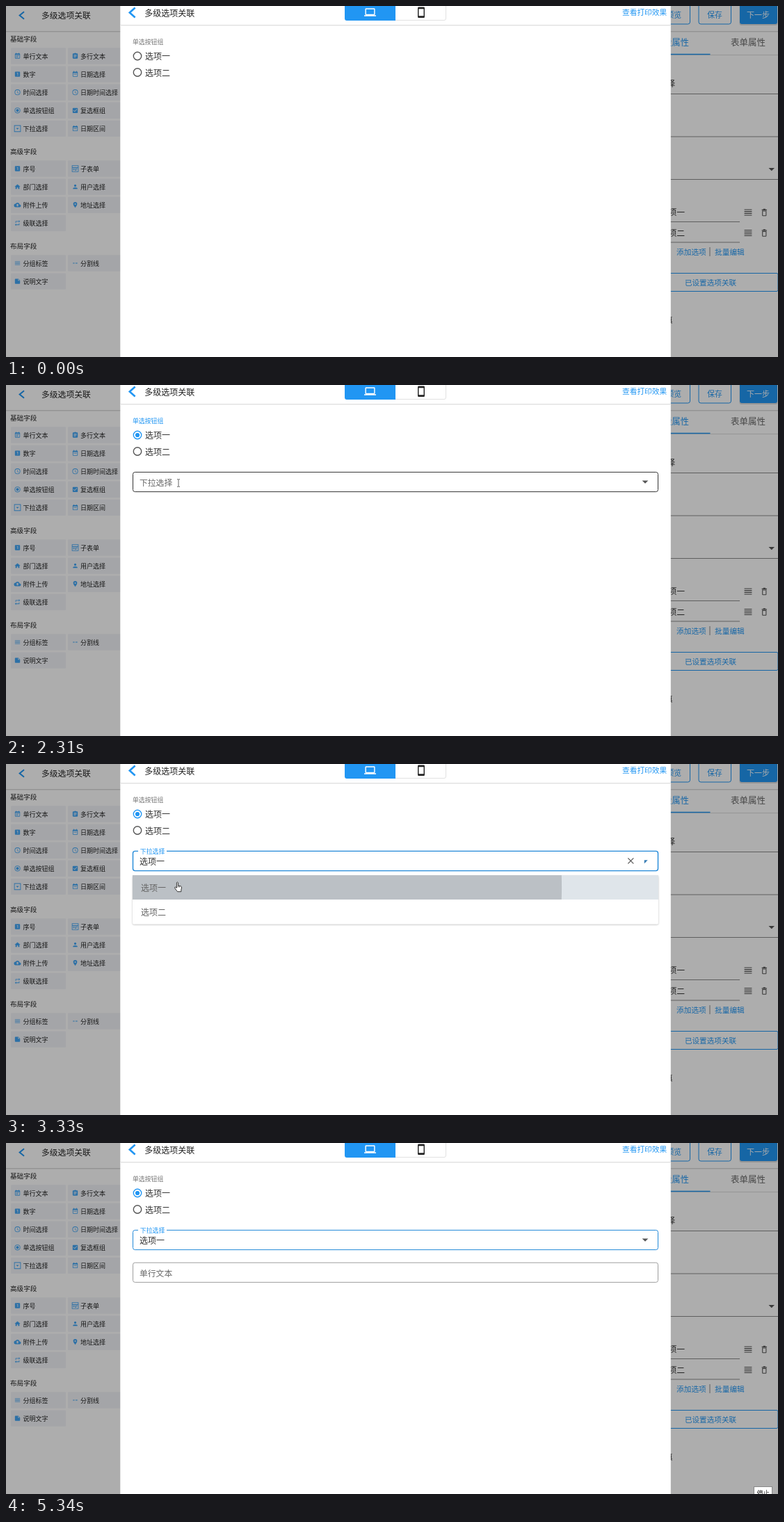
An HTML page that plays this animation: 1110x505 px, repeating every 5430 ms.

```html
<!DOCTYPE html>
<html lang="zh-CN">
<head>
<meta charset="utf-8">
<title>多级选项关联</title>
<style>
html, body { margin: 0; width: 100%; height: 100%; overflow: hidden; background: #fff; }
svg { display: block; width: 1110px; height: 505px; }
text { font-family: "Noto Sans CJK SC", "Noto Sans CJK", "Noto Sans", sans-serif; font-weight: 300; white-space: pre; }
</style>
</head>
<body>
<svg id="stage" viewBox="0 0 1110 505" xmlns="http://www.w3.org/2000/svg"></svg>
<script>
const LOOP = 5430, TICK = 77.5, LAST = 69;
const BLUE = '#2196f3', INK = '#333', GREY = '#666';

// ---- markup helpers; text is placed by its vertical centre ----
const text = (x, cy, size, str, fill = INK, extra = '') =>
  `<text x="${x}" y="${cy + size * 0.38}" font-size="${size}" fill="${fill}" ${extra}>${str}</text>`;
const rect = (x, y, w, h, fill, extra = '') =>
  `<rect x="${x}" y="${y}" width="${w}" height="${h}" fill="${fill}" ${extra}/>`;
const line = (x1, y1, x2, y2, stroke, width = 1) =>
  `<path d="M${x1} ${y1}L${x2} ${y2}" stroke="${stroke}" stroke-width="${width}" fill="none"/>`;
const END = 'text-anchor="end"', MID = 'text-anchor="middle"';

// ---- icons on a 24 unit grid ----
const frame = 'M5 3H19Q21 3 21 5V19Q21 21 19 21H5Q3 21 3 19V5Q3 3 5 3Z';
const pegs = 'M6 1H8V3H6ZM16 1H18V3H16Z';
const ring = 'M12 2A10 10 0 0 1 12 22A10 10 0 0 1 12 2ZM12 4A8 8 0 0 0 12 20A8 8 0 0 0 12 4Z';
const icons = {
  line: frame + pegs + 'M5 8H19V19H5ZM7 10H17V12H7ZM7 14H14V16H7Z',
  area: frame + 'M9 3Q9 1 12 1Q15 1 15 3ZM7 7H17V9H7ZM7 11H17V13H7ZM7 15H14V17H7Z',
  one: frame + 'M10 7H14V17H12V9H10Z',
  date: frame + pegs + 'M5 8H19V19H5ZM7 11H17V13H7Z',
  clock: ring + 'M11 7H12.5V12.2L17 15L16.2 16.2L11 13Z',
  radio: ring + 'M12 7A5 5 0 0 1 12 17A5 5 0 0 1 12 7Z',
  check: frame + 'M10 17L5 12L6.4 10.6L10 14.2L17.6 6.6L19 8Z',
  drop: 'M1 1H23V23H1ZM3 3V21H21V3ZM7 10H17L12 15Z',
  table: 'M1 1H23V23H1ZM3 3V7H21V3ZM3 9V21H21V9ZM5 11H10V13H5ZM12 11H19V13H12ZM5 15H10V17H5ZM12 15H16V19H12Z',
  home: 'M10 20V14H14V20H19V12H22L12 3L2 12H5V20Z',
  user: 'M12 4A4 4 0 0 1 12 12A4 4 0 0 1 12 4ZM12 14Q20 14 20 18V20H4V18Q4 14 12 14Z',
  cloud: 'M6 20A6 6 0 0 1 5.3 8A7.5 7.5 0 0 1 19.3 10A5 5 0 0 1 19 20ZM14 13H17L12 8L7 13H10V17H14Z',
  pin: 'M12 2A7 7 0 0 1 19 9Q19 14 12 22Q5 14 5 9A7 7 0 0 1 12 2ZM12 6.5A2.5 2.5 0 0 0 12 11.5A2.5 2.5 0 0 0 12 6.5Z',
  loop: 'M17 17H7V14L3 18L7 22V19H19V13H17ZM7 7H17V10L21 6L17 2V5H5V11H7Z',
  rows: 'M3 6H21V8H3ZM3 11H21V13H3ZM3 16H21V18H3Z',
  dash: 'M4 11H10V13H4ZM13 11H20V13H13Z',
  note: 'M5 3H15L21 9V19Q21 21 19 21H5Q3 21 3 19V5Q3 3 5 3ZM14 4.5V10H19.5Z',
  lines: 'M2 3.5H22V5.5H2ZM2 8.5H22V10.5H2ZM2 13.5H22V15.5H2ZM2 18.5H22V20.5H2Z',
  trash: 'M5 4H9V2H15V4H19V6H5ZM6 7H18V20Q18 22 16 22H8Q6 22 6 20ZM8 9V20H16V9Z',
  laptop: 'M4 6V16H20V6ZM4 4H20Q22 4 22 6V16Q22 18 20 18H24V20H0V18H4Q2 18 2 16V6Q2 4 4 4Z',
  phone: 'M7 1H17Q19 1 19 3V21Q19 23 17 23H7Q5 23 5 21V3Q5 1 7 1ZM7 5V19H17V5Z'
};
const icon = (name, cx, cy, size, fill = BLUE, extra = '') =>
  `<path d="${icons[name]}" fill="${fill}" fill-rule="evenodd" ${extra} ` +
  `transform="translate(${cx - size / 2} ${cy - size / 2}) scale(${size / 24})"/>`;
const chevron = (cx, cy, w, h, width) =>
  `<path d="M${cx + w} ${cy - h}L${cx - w} ${cy}L${cx + w} ${cy + h}" fill="none" stroke="${BLUE}" stroke-width="${width}"/>`;

// ---- page behind the dialog ----
const groups = [
  ['基础字段', 47.5, 72, [['line', '单行文本'], ['area', '多行文本'], ['one', '数字'], ['date', '日期选择'],
    ['clock', '时间选择'], ['clock', '日期时间选择'], ['radio', '单选按钮组'], ['check', '复选框组'],
    ['drop', '下拉选择'], ['date', '日期区间']]],
  ['高级字段', 209, 234, [['one', '序号'], ['table', '子表单'], ['home', '部门选择'], ['user', '用户选择'],
    ['cloud', '附件上传'], ['pin', '地址选择'], ['loop', '级联选择']]],
  ['布局字段', 345, 370, [['rows', '分组标签'], ['dash', '分割线'], ['note', '说明文字']]]
];
function palette() {
  return groups.map(([title, ty, top, list]) => text(6, ty, 9.6, title, '#222') + list.map(([ic, name], i) => {
    const x = i % 2 ? 89 : 7, cy = top + (i >> 1) * 26.1;
    const big = ic === 'drop' || ic === 'table';
    return rect(x, cy - 11.7, i % 2 ? 80 : 79, 23.4, '#f1f3f7', 'rx="1"') +
      icon(ic, x + (i % 2 ? 10.5 : 9.5), cy, big ? 10.5 : 9.8, BLUE, 'opacity=".85"') +
      text(x + (i % 2 ? 18 : 17.5), cy + .3, 9, name, '#222');
  }).join('')).join('');
}
function settings() {
  let s = rect(920, -4.5, 63.5, 30.5, 'none', `rx="3" stroke="${BLUE}"`) + text(971, 13, 10.8, '预览', BLUE, END) +
    rect(996, -4.5, 46.5, 30.5, 'none', `rx="3" stroke="${BLUE}"`) + text(1019, 13, 10.8, '保存', BLUE, MID) +
    rect(1054.5, -3, 55, 31, '#000', 'rx="3" opacity=".14"') + rect(1055, -5, 54, 31, BLUE, 'rx="3"') +
    text(1081.5, 13, 11, '下一步', '#fff', MID) +
    line(0, 36.5, 1110, 36.5, '#d8d8d8') + line(0, 37.5, 1110, 37.5, '#eee') +
    text(982, 52, 12.2, '字段属性', BLUE, END) + text(1067, 52, 12.5, '表单属性', GREY, MID) +
    line(950, 70.5, 1110, 70.5, '#ddd') + line(950, 69.5, 1012.5, 69.5, BLUE, 1.6) +
    text(962, 112, 11.8, '下拉选择', INK, END) +
    [126.5, 188, 249.5].map(y => line(950, y, 1110, y, '#8b8b8b')).join('') +
    '<path d="M1096.5 233H1105L1100.8 237.3Z" fill="#555"/>';
  [['选项一', 297], ['选项二', 326.5]].forEach(([name, y]) => {
    s += text(976, y, 11.8, name, INK, END) + line(950, y + 13.5, 1055, y + 13.5, '#8b8b8b') +
      icon('lines', 1067, y, 13, '#555') + icon('trash', 1090.3, y, 12.5, '#555');
  });
  return s + text(964, 353.5, 10.7, '添加选项', BLUE) + line(1012, 347, 1012, 360, '#888') +
    text(1019, 353.5, 10.7, '批量编辑', BLUE) +
    rect(900, 384.5, 210, 26, 'none', `rx="2" stroke="${BLUE}"`) +
    text(1013, 397.5, 10.6, '已设置选项关联', BLUE, MID) + text(958.5, 452, 11, '必填', INK, END);
}

// ---- dialog ----
const radio = (id, cy, name) =>
  `<circle id="${id}" cx="189" cy="${cy}" r="5.7" fill="none" stroke="#555" stroke-width="1.4"/>` + text(200, cy + .6, 12, name);
const outline = (id, y) => rect(182.5, y, 755, 28.2, '#fff', `id="${id}" rx="3" stroke="#9e9e9e"`);
const dialog = () => rect(164.3, 0, 791.5, 505, '#fff') +
  chevron(181.7, 9.5, 3.9, 7, 2.6) + text(199.3, 10, 12, '多级选项关联', '#222') +
  '<path d="M487 0H560V21H490Q487 21 487 18Z" fill="#2196f3"/>' +
  '<path d="M560 20.5H630Q632.5 20.5 632.5 18V0" fill="none" stroke="#e2e2e2"/>' +
  icon('laptop', 523.5, 9, 17, '#fff') + icon('phone', 597, 9.3, 17, '#222') +
  text(886, 9, 10.7, '查看打印效果', BLUE) +
  line(164, 27.5, 956, 27.5, '#dedede') + line(164, 28.5, 956, 28.5, '#f5f5f5') +
  text(182, 52, 8.9, '单选按钮组', '#777', 'id="group"') +
  `<circle id="splash" cx="189" cy="72" r="14" fill="${BLUE}"/>` +
  radio('first', 72, '选项一') + radio('second', 95.5, '选项二') +
  `<circle id="dot" cx="189" cy="72" r="3" fill="${BLUE}"/>` +
  '<g id="select">' + outline('box', 125.4) + rect(190, 123, 41, 5, '#fff', 'id="notch"') +
  '<text id="label">下拉选择</text>' + text(192, 140, 12, '选项一', INK, 'id="value"') +
  '<path id="clear" d="M894.3 135.3L902.3 143.3M902.3 135.3L894.3 143.3" stroke="#555" stroke-width="1.2"/>' +
  '<path id="caret" d="M-4.4 -2.2H4.4L0 2.2Z"/></g>' +
  '<g id="field">' + outline('box2', 172.2) + text(192, 188, 11.8, '单行文本', GREY) + '</g>' +
  '<g id="menu"><g filter="url(#shade)">' + rect(182, 160, 756, 70.3, '#fff', 'rx="2"') + '</g>' +
  rect(182, 160, 756, 35, '#f2f2f2', 'id="hover"') +
  '<circle id="ripple" cx="247" cy="177" fill="#000" opacity=".16" clip-path="url(#row)"/>' +
  text(194, 178, 12, '选项一', GREY) + text(194, 213.3, 12, '选项二', GREY) + '</g>';

const pointers = () =>
  '<g id="arrow"><path d="M0 0V10L2.4 7.9L4.1 11.7L5.7 11L4 7.3H7.2Z" fill="#fff" stroke="#222" stroke-width=".9"/></g>' +
  '<g id="hand"><path d="M-1 1.2Q0 -.3 1 1.2V5.4L5 6.4Q6.3 6.9 6.1 8.5L5.4 11.5V14.2H.2L-3.6 9.2Q-4.3 7.6 -2.7 7.6L-1 8.8Z" fill="#fff" stroke="#222" stroke-width=".9"/>' +
  '<path d="M1 5.5V8M3 6V8.2" stroke="#222" stroke-width=".7"/></g>' +
  '<g id="beam"><path d="M-2 -5.3H-.8L0 -4.8L.8 -5.3H2M0 -4.8V4.8M-2 5.3H-.8L0 4.8L.8 5.3H2" fill="none" stroke="#555" stroke-width=".9"/></g>';

const stage = document.getElementById('stage');
stage.innerHTML = '<defs><clipPath id="row"><rect x="182" y="160" width="756" height="35"/></clipPath>' +
  '<filter id="shade" x="-5%" y="-20%" width="110%" height="150%"><feDropShadow dx="0" dy="1" stdDeviation="1.3" flood-opacity=".28"/></filter></defs>' +
  rect(0, 0, 1110, 505, '#fff') + chevron(22.8, 13.5, 3.2, 5.2, 2) + text(51, 13.7, 11.8, '多级选项关联', '#222') +
  palette() + settings() + rect(0, 0, 1110, 505, '#000', 'opacity=".32"') + dialog() +
  '<g id="tip">' + rect(1075.5, 494.5, 26, 16, '#fff', 'stroke="#888"') + text(1079.5, 503.3, 9.2, '停止', '#222') + '</g>' + pointers();

// ---- motion, in ticks ----
const el = {};
stage.querySelectorAll('[id]').forEach(n => el[n.id] = n);
const set = (id, attrs) => { for (const k in attrs) el[id].setAttribute(k, attrs[k]); };
const show = (id, on) => { el[id].style.display = on ? '' : 'none'; };
const ramp = (s, a, b) => Math.min(1, Math.max(0, (s - a) / (b - a)));
const smooth = u => u * u * (3 - 2 * u);
const mix = (a, b, u) => `rgb(${a.map((v, i) => Math.round(v + (b[i] - v) * u))})`;

const path = [[1, 970, 431], [8, 192, 28], [9, 198, 46], [10, 204, 66], [11, 209, 82], [13, 209, 82],
  [15, 204.6, 75], [24, 204.6, 75], [30, 248, 141], [38, 248, 141], [42, 246.4, 169.5], [45, 246.4, 169.5],
  [46, 248, 176], [50, 248, 176], [51, 313, 226], [58, 943, 479], [59, 962, 487], [60, 996, 500]];
const shapes = [[0, ''], [1, 'arrow'], [10, 'hand'], [26, 'arrow'], [28, 'beam'], [40, 'arrow'], [41, 'hand'],
  [46, 'beam'], [51, 'arrow'], [61, '']];

function pointer(s) {
  const shape = shapes.filter(k => k[0] <= s).pop()[1];
  const i = Math.max(0, path.filter(p => p[0] <= s).length - 1);
  const a = path[i], b = path[i + 1] || a;
  const u = a === b ? 0 : smooth(ramp(s, a[0], b[0]));
  const at = `translate(${a[1] + (b[1] - a[1]) * u} ${a[2] + (b[2] - a[2]) * u})`;
  ['arrow', 'hand', 'beam'].forEach(n => { show(n, n === shape); set(n, { transform: at }); });
}

function draw(s) {
  // radio group
  set('group', { fill: mix([119, 119, 119], [33, 150, 243], ramp(s, 18, 21.5) - ramp(s, 31.2, 33.7)) });
  set('first', { stroke: s >= 18 ? BLUE : '#555' });
  set('dot', { r: 3.1 * ramp(s, 17, 19) });
  set('splash', { opacity: s >= 17 ? .14 * (1 - ramp(s, 17, 20)) : 0, r: 8 + 7 * ramp(s, 16, 19) });

  // select
  const focus = s >= 32, up = smooth(ramp(s, 31, 33.8)), size = 11.8 - 2.9 * up;
  show('select', s >= 21);
  set('box', {
    stroke: focus ? '#2088d8' : s >= 28 ? INK : '#9e9e9e',
    'stroke-width': focus && s < LAST ? 1.4 : 1
  });
  show('notch', focus);
  set('label', { x: 192 + .8 * up, y: 141 - 15 * up + size * .38, 'font-size': size, fill: focus ? BLUE : GREY });
  show('value', s >= 43);
  show('clear', s >= 43 && s < LAST);
  const turn = s < 42 ? -180 * ramp(s, 31, 35) : 180 * (1 - ramp(s, 42, 46));
  const squeeze = 1 - .3 * Math.abs(Math.sin(turn * Math.PI / 180));
  set('caret', {
    transform: `translate(919 139.6) rotate(${turn}) scale(${squeeze})`,
    fill: mix([85, 85, 85], [33, 150, 243], ramp(s, 31, 34) - ramp(s, 41, 46))
  });

  // menu and the field it reveals
  const open = ramp(s, 32, 35), shut = ramp(s, 43, 46);
  const grow = 1 - .095 * (1 - open) ** 2 - .02 * shut;
  show('menu', s >= 33 && s < 46);
  set('menu', {
    opacity: Math.min(1, open * 1.5) * (1 - shut),
    transform: `translate(560 195.5) scale(${grow}) translate(-560 -195.5)`
  });
  show('hover', s >= 41);
  set('hover', { fill: s >= 43 ? '#dfe5ea' : '#f2f2f2' });
  set('ripple', { r: s >= 42 ? 306.7 * (s - 41.2) : 0 });
  show('field', s >= 45);

  show('tip', s >= 64);
  set('tip', { opacity: ramp(s, 63, 67) });
  pointer(s);
}

// The screen refreshes in steady ticks, so time is snapped to them.
const start = performance.now();
function run() {
  const t = (performance.now() - start) % LOOP;
  draw(Math.min(LAST, Math.floor((t + 20) / TICK)));
  requestAnimationFrame(run);
}
run();
</script>
</body>
</html>
```
